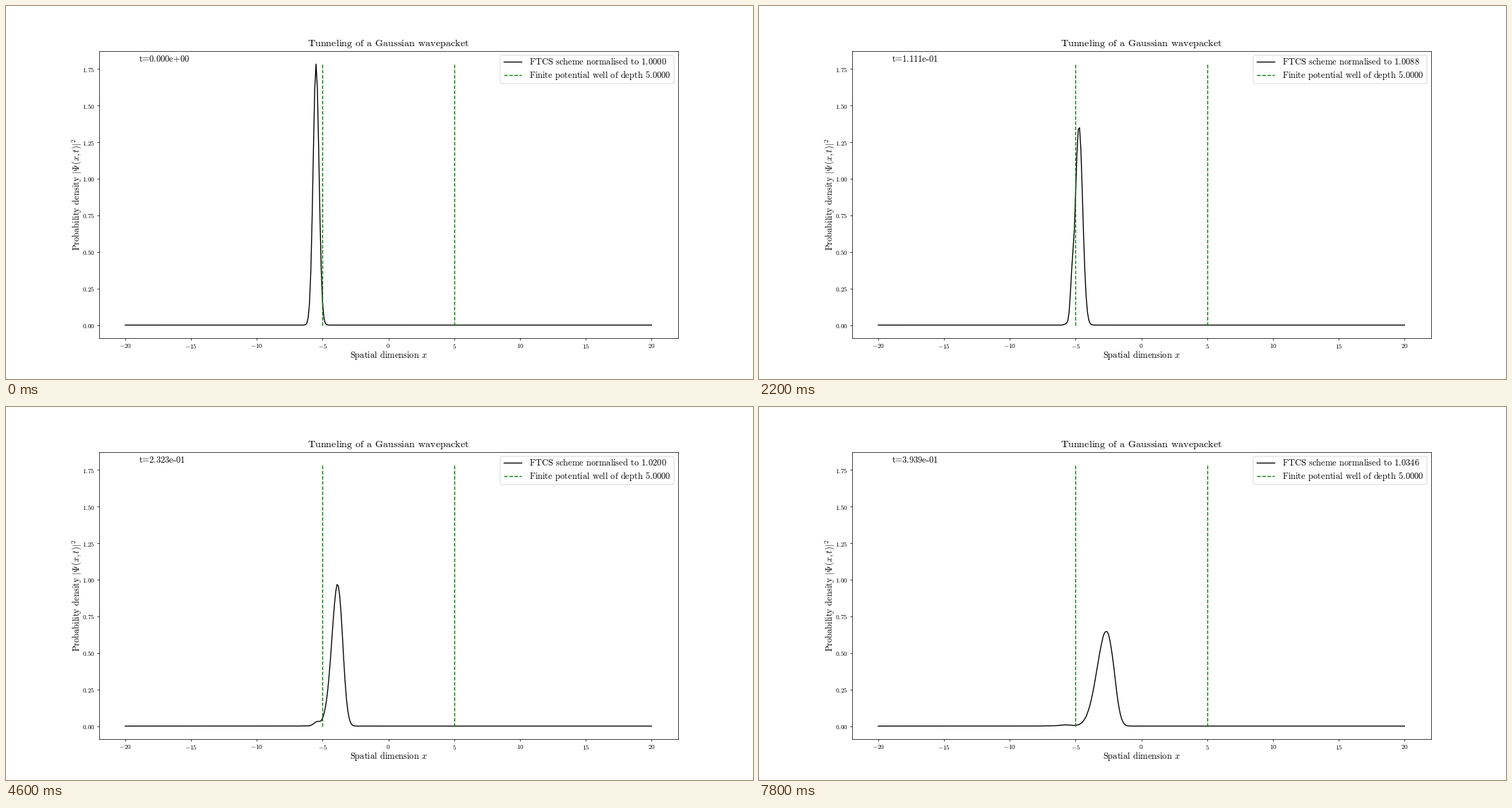
These frames come from a looping animation (1058 px wide and 529 px high, 8 s). A matplotlib script:

```python
import numpy as np
import matplotlib.pyplot as plt
from matplotlib.animation import FuncAnimation
from matplotlib.patches import FancyBboxPatch
from matplotlib.transforms import IdentityTransform

plt.rcParams["mathtext.fontset"] = "cm"
plt.rcParams["font.family"] = "Liberation Serif"

W, H = 1058, 529
FRAMES, INTERVAL = 40, 200
STEPS_PER_FRAME, DT = 101, 1e-4
X0, K0, WIDTH_SQ = -5.5, 7.0, 0.1
WELL, DEPTH = 5.0, 5.0
LABEL, TITLE = 13.6, 15.45

x = np.linspace(-20, 20, 401)
dx = x[1] - x[0]


def simpson(y):
    return dx / 3 * (y[0] + y[-1] + 4 * y[1:-1:2].sum() + 2 * y[2:-1:2].sum())


def evolve():
    """Densities of the packet, stepped forward in time, centred in space."""
    psi = np.exp(-(x - X0) ** 2 / (2 * WIDTH_SQ) + 1j * K0 * x)
    psi /= np.sqrt(simpson(abs(psi) ** 2))
    potential = np.where(abs(x) < WELL + dx / 2, -DEPTH, 0.0)
    densities = [abs(psi) ** 2]
    for _ in range(FRAMES - 1):
        for _ in range(STEPS_PER_FRAME):
            h_psi = potential * psi
            h_psi[1:-1] -= (psi[2:] - 2 * psi[1:-1] + psi[:-2]) / (2 * dx**2)
            psi = psi - 1j * DT * h_psi
        densities.append(abs(psi) ** 2)
    return densities


def roman(text):
    """Upright Computer Modern with ordinary word spaces."""
    return r"$\mathrm{" + text.replace(" ", r"\hspace{0.38}") + "}$"


def time_label(t):
    number = f"{t:.3e}".replace("+", "{+}").replace("-", " ")
    return roman(r"t\hspace{-0.2}=\hspace{-0.2}" + number)


def norm_label(density):
    return roman(f"FTCS scheme normalised to {simpson(density):.4f}")


densities = evolve()
peak = densities[0].max()

fig, ax = plt.subplots(figsize=(16, 8), dpi=W / 16)
fig.subplots_adjust(left=131.65 / W, right=951.6 / W,
                    bottom=1 - 471.05 / H, top=1 - 63.75 / H)
curve, = ax.plot(x, densities[0], "k", label=norm_label(densities[0]))
ax.vlines([-WELL, WELL], 0, peak, colors="g", linestyles="dashed",
          label=roman(f"Finite potential well of depth {DEPTH:.4f}"))
clock = ax.text(-19, 1.8, time_label(0), fontsize=LABEL)
# Text hyphen of the exponent, which math type would set as a long minus.
hyphen, = ax.plot([-16.375, -16.19], [1.813] * 2, "k", lw=0.9,
                  solid_capstyle="butt")

ax.set_title(roman("Tunneling of a Gaussian wavepacket"), fontsize=TITLE,
             pad=7)
ax.set_xlabel(roman("Spatial dimension ") + "$x$", fontsize=LABEL, labelpad=-1)
ax.set_ylabel(roman("Probability density ") + r"$|\Psi(x,t)|^2$",
              fontsize=LABEL, labelpad=-0.9)
ax.set_xlim(-22, 22)
ax.set_ylim(-0.05 * peak, 1.05 * peak)
ax.set_xticks(np.arange(-20, 21, 5))
ax.set_yticks(np.arange(0, 1.8, 0.25))
ax.tick_params(axis="x", pad=2.5)
ax.tick_params(axis="y", pad=2.9)
ax.xaxis.set_major_formatter(lambda v, _: f"${{{v:g}}}$")
ax.yaxis.set_major_formatter(lambda v, _: f"${v:.2f}$")

# The frame is drawn apart, as the math labels would make it too tall.
legend = ax.legend(loc="upper right", fontsize=14, frameon=False,
                   labelspacing=0.28, bbox_to_anchor=(1.0015, 1.007))
for entry in legend.get_texts():
    entry.set_fontsize(LABEL)
ax.add_patch(FancyBboxPatch((700, H - 110), 246, 40, fc="white", ec="0.8",
                            alpha=0.8, zorder=4,
                            boxstyle="round,pad=0,rounding_size=2.6",
                            transform=IdentityTransform()))


def update(i):
    curve.set_ydata(densities[i])
    clock.set_text(time_label(i * STEPS_PER_FRAME * DT))
    hyphen.set_visible(i > 0)
    legend.get_texts()[0].set_text(norm_label(densities[i]))
    return curve, clock, hyphen, legend


anim = FuncAnimation(fig, update, frames=FRAMES, interval=INTERVAL,
                     init_func=lambda: update(0), repeat=True, repeat_delay=0)
plt.show()
```
